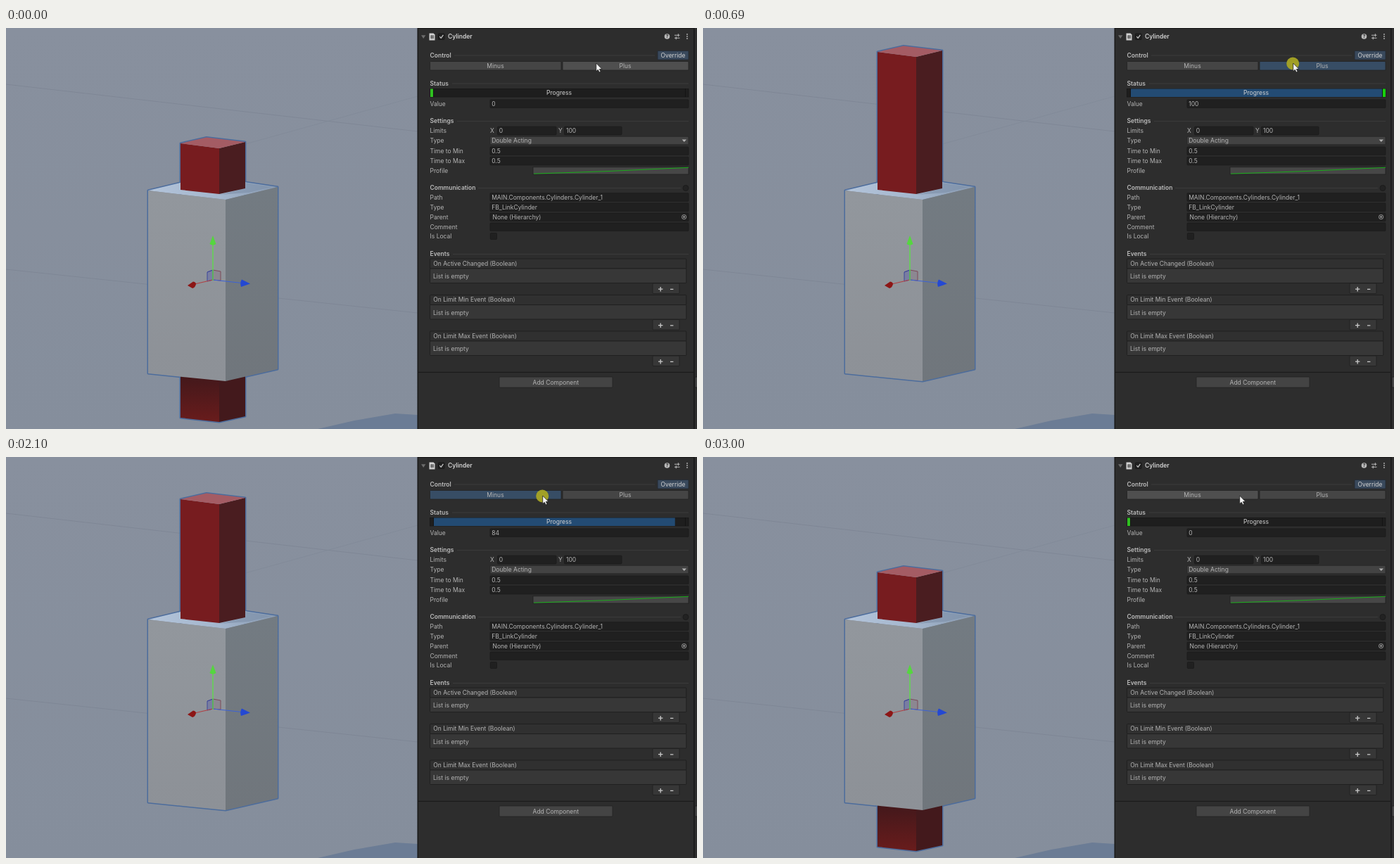
An HTML page that plays this animation: 982x570 px, repeating every 3070 ms.

```html
<!DOCTYPE html>
<html lang="en">
<head>
<meta charset="utf-8">
<title>Cylinder inspector</title>
<style>
  html, body { margin: 0; width: 100%; height: 100%; overflow: hidden; background: #2d2d2d; }
  svg { display: block; }
  text { font: 8.5px Inter, sans-serif; fill: #b4b4b4; white-space: pre; }
  .bold { font-weight: 600; fill: #bcbcbc; }
  .mid { text-anchor: middle; }
  .bright { fill: #d2d2d2; }
</style>
</head>
<body>
<svg id="stage" width="982" height="570" viewBox="0 0 982 570">
  <defs>
    <linearGradient id="sky" x2="0" y2="1"><stop stop-color="#88909e"/><stop offset="1" stop-color="#858e9c"/></linearGradient>
    <linearGradient id="lid"><stop stop-color="#b3c4da"/><stop offset=".55" stop-color="#a4b6cd"/><stop offset="1" stop-color="#8799b0"/></linearGradient>
    <linearGradient id="front" x2="0" y2="1"><stop stop-color="#92979d"/><stop offset="1" stop-color="#8d9197"/></linearGradient>
    <linearGradient id="side" x2="0" y2="1"><stop stop-color="#737b82"/><stop offset="1" stop-color="#70767c"/></linearGradient>
    <linearGradient id="under" gradientUnits="userSpaceOnUse" x1="0" y1="495" x2="0" y2="562"><stop stop-color="#43181b"/><stop offset="1" stop-color="#6a1c1c"/></linearGradient>
    <clipPath id="view"><path d="M0 0H585V570H0Z"/></clipPath>
  </defs>
  <g id="scene" clip-path="url(#view)"></g>
  <g id="panel"></g>
  <g id="pointer"></g>
</svg>
<script>
const LOOP = 3070;
const $ = id => document.getElementById(id);
const scene = $('scene'), panel = $('panel'), pointer = $('pointer');

function add(parent, tag, attrs, text) {
  const el = document.createElementNS('http://www.w3.org/2000/svg', tag);
  for (const key in attrs) el.setAttribute(key, attrs[key]);
  if (text !== undefined) el.textContent = text;
  return parent.appendChild(el);
}
const set = (el, key, value) => el.setAttribute(key, value);
const path = (parent, d, fill, extra) => add(parent, 'path', { d, fill, ...extra });
const line = (parent, d, stroke, width = 1) => path(parent, d, 'none', { stroke, 'stroke-width': width });
const circle = (parent, cx, cy, r, fill, extra) => add(parent, 'circle', { cx, cy, r, fill, ...extra });
const box = (x, y, x2, y2, fill, stroke = 'none', rx = 1) =>
  add(panel, 'rect', { x, y, width: x2 - x, height: y2 - y, fill, stroke, 'stroke-width': .8, rx });
// y is the middle of the text line
const label = (x, y, text, cls = '') => add(panel, 'text', { x, y: y + 3.1, class: cls }, text);
const clamp = (v, lo, hi) => Math.min(hi, Math.max(lo, v));

// ---- 3D view ----
path(scene, 'M0 0H585V570H0Z', 'url(#sky)');
line(scene, 'M0 80L585 147M0 343L585 405', '#7d8594', .8);
line(scene, 'M585 97L250 190', '#808897', .7);
path(scene, 'M443 570L495 558 553 548 585 550V570Z', '#6b7c95');

const outline = { stroke: '#4c6c9c', 'stroke-width': 3, 'stroke-linejoin': 'round' };
const rodEdge = path(scene, '', 'none', outline);
path(scene, 'M202 231L285 211 386 226V485L312 502 202 491Z', 'none', outline);

const lowLeft = path(scene, '', 'url(#under)');
const lowRight = path(scene, '', '#43191c');
path(scene, 'M202 231L285 211 386 226 312 244Z', 'url(#lid)');
path(scene, 'M303 237L340 228 340 220 378 226 345 234Z', '#7e90a8', { opacity: .6 });
path(scene, 'M202 231L312 244V502L202 491Z', 'url(#front)');
path(scene, 'M312 244L386 226V485L312 502Z', 'url(#side)');
const rodLeft = path(scene, '', '#771c1f');
const rodRight = path(scene, '', '#4a1d20');
const rodTop = path(scene, '', '#a45c64');

function drawRod(p) {
  const up = 130 * p, y = v => (v - up).toFixed(2);
  const top = `M248 ${y(164)}L285 ${y(155.5)} 340 ${y(162)} 303 ${y(171)}Z`;
  set(rodTop, 'd', top);
  set(rodLeft, 'd', `M248 ${y(164)}L303 ${y(171)}V236L248 230Z`);
  set(rodRight, 'd', `M303 ${y(171)}L340 ${y(162)}V228L303 236Z`);
  set(lowLeft, 'd', `M248 400V${y(554)}L303 ${y(560)}V400Z`);
  set(lowRight, 'd', `M303 400V${y(560)}L340 ${y(552)}V400Z`);
  set(rodEdge, 'd', `M248 ${y(164)}L285 ${y(155.5)} 340 ${y(162)}V${y(552)}L303 ${y(560)} 248 ${y(554)}Z`);
}

// move handles
path(scene, 'M286 347L294 344V358L286 360Z', '#6a70a6', { stroke: '#3f4799', 'fill-opacity': .6 });
path(scene, 'M294 344L305 346V359L294 358Z', '#8b7f8c', { stroke: '#7c4a58', 'fill-opacity': .6 });
line(scene, 'M286 347L294 344V358', '#3f4799');
line(scene, 'M294 358L268 364', '#b04044', 1.2);
line(scene, 'M294 358L335 362.5', '#3c62d6', 1.2);
line(scene, 'M294 359V307', '#5edb4c', 1.4);
path(scene, 'M294 295L298.5 307Q294 310 289.5 307Z', '#55d63f');
path(scene, 'M258 366L266 360.5Q270 361 270 364 269 369 265 370Z', '#8c1616');
path(scene, 'M347 363.5L335 357.5Q332 362 334 368Z', '#2448d2');

// ---- inspector ----
const EDGE = '#1b1b1b', FIELD = '#202020';
box(585, 0, 982, 570, '#2d2d2d', 'none', 0);
box(584.5, 0, 586, 570, '#191919', 'none', 0);
box(586, 0, 977, 1.2, '#1d1d1d', 'none', 0);
box(977, 0, 978.6, 570, '#191919', 'none', 0);
box(979, 496, 984, 511, '#454545', EDGE);

path(panel, 'M590 10.3H596.4L593.2 15Z', '#6c6c6c');
path(panel, 'M601.5 7.5H607.5L609.5 9.5V17.5H601.5Z', '#d0d0d0');
line(panel, 'M604.6 10V15.4M606.8 10V15.4M603 11.7H608.2M603 13.8H608.2', '#3a3a3a', .8);
box(614.5, 8, 623, 16.5, '#222', '#151515');
line(panel, 'M616.3 12.2L618.2 14.3 621.4 9.8', '#cfcfcf', 1.2);
label(628, 12, 'Cylinder', 'bold bright');
circle(panel, 939.5, 12, 3.8, '#b8b8b8');
add(panel, 'text', { x: 939.5, y: 14.4, class: 'mid', style: 'font-size:6.5px;font-weight:700;fill:#2d2d2d' }, '?');
line(panel, 'M950 10.3H957.5M950 14.2H957.5M955.4 8.3V12.3M952.3 12.2V16.2', '#b8b8b8', 1.1);
for (const dy of [-3, 0, 3]) circle(panel, 968, 12 + dy, .9, '#b8b8b8');

const heads = [['Control', 38.5, 637, 922], ['Status', 78.5, 634, 970], ['Settings', 132, 641, 970],
  ['Communication', 227, 671, 959], ['Events', 321, 635, 970]];
for (const [name, y, x, x2] of heads) {
  label(602.5, y, name, 'bold');
  line(panel, `M${x} ${y + .5}H${x2}`, '#3d3d3d', .9);
}
circle(panel, 966, 227.5, 4, '#222', { stroke: '#1c1c1c' });

box(926, 32.5, 970, 45, '#39495c', '#222a34');
label(948, 38.5, 'Override', 'mid bright');
const minus = box(602.5, 47.5, 789, 60, '#464646', '#232323');
const plus = box(791, 47.5, 970, 60, '#464646', '#232323');
label(695.5, 53.5, 'Minus', 'mid');
label(880, 53.5, 'Plus', 'mid');

box(602.5, 86.5, 970, 98, '#1e1e1e', '#181818', 0);
const bar = box(608, 86.5, 608, 98, '#234b73', 'none', 0);
line(panel, 'M607.5 86V98M965.5 86V98', '#141414', .9);
const lowLamp = box(603, 86.5, 607, 98, '#2fc020', 'none', 0);
const highLamp = box(966, 86.5, 970, 98, '#18d20c', 'none', 0);
label(786, 92, 'Progress', 'mid bright');

function row(y, name, text, x2 = 970, x = 688) {
  label(602.5, y, name);
  box(x, y - 5.8, x2, y + 5.8, FIELD, EDGE);
  return label(x + 2.2, y, text);
}
const value = row(107.7, 'Value', '0');
row(146, 'Limits', '0', 782, 698.5);
label(688, 146, 'X');
box(793.5, 140.2, 875, 151.8, FIELD, EDGE);
label(785, 146, 'Y');
label(796, 146, '100');
label(602.5, 160, 'Type');
box(688, 154.2, 970, 165.8, '#434343', '#252525');
label(690.2, 160, 'Double Acting');
path(panel, 'M960.7 158.4H967L963.8 162Z', '#b4b4b4');
row(174.8, 'Time to Min', '0.5');
row(189, 'Time to Max', '0.5');
label(602.5, 203, 'Profile');
box(749, 197.8, 970, 208, '#474747', '#202020', 0);
line(panel, 'M750 207.2L855 203.6 970 198.3', '#18ad18');

row(240.5, 'Path', 'MAIN.Components.Cylinders.Cylinder_1');
row(254.7, 'Type', 'FB_LinkCylinder');
row(268.8, 'Parent', '').remove();
label(691.5, 268.8, 'None (Hierarchy)');
circle(panel, 963.6, 268.6, 3.1, 'none', { stroke: '#a8a8a8', 'stroke-width': .9 });
circle(panel, 963.6, 268.6, 1.3, '#a8a8a8');
row(282.8, 'Comment', '');
label(602.5, 296, 'Is Local');
box(688.3, 291.5, 697.5, 300.5, FIELD, EDGE);

['Active Changed', 'Limit Min Event', 'Limit Max Event'].forEach((name, i) => {
  const y = 328 + 51.5 * i;
  box(602.5, y, 966.8, y + 14, '#303030', '#1c1c1c');
  box(602.5, y + 14, 966.8, y + 34.5, '#373737', '#1c1c1c');
  box(919, y + 35, 957, y + 49.5, '#373737', '#1f1f1f');
  label(607.3, y + 6.8, `On ${name} (Boolean)`);
  label(607, y + 25.3, 'List is empty');
  line(panel, `M927 ${y + 43.2}H933.4M930.2 ${y + 40}V${y + 46.4}M944 ${y + 43.4}H948.4`, '#cacaca', 1.3);
});

box(586, 488.8, 977, 490, '#1a1a1a', 'none', 0);
box(701, 496, 862, 511, '#444', '#232323');
label(781.3, 503.5, 'Add Component', 'mid');

const halo = circle(pointer, -.5, .5, 9, '#a5a324', { opacity: .96 });
path(pointer, 'M0 0V11.6L2.6 9.3 4.4 13 6.4 12.1 4.7 8.5H8.3Z', '#f4f4f4',
  { stroke: '#1c1c1c', 'stroke-width': .8, 'stroke-linejoin': 'round' });

// ---- motion ----
const PRESS = '#374d65', HOVER = '#4f4f4f', IDLE = '#454545';
const stepOf = (t, start, length) => Math.floor((t - start) / length);

function render(t) {
  const down = t >= 2030;
  // travel grows 14 per screen update, counted in physics ticks of 4
  let u = -20;
  if (down) u = 4 + 14 * stepOf(t, 2027, 71.4);
  else if (t >= 130) u = 8 + 14 * stepOf(t, 130, 70);
  u = Math.floor(u / 4) * 4;
  const travel = offset => {
    const v = clamp(u + offset, 0, 100);
    return down ? 100 - v : v;
  };

  const shown = travel(0), done = travel(-12);
  drawRod(travel(4) / 100);
  value.textContent = down && shown > 0 && shown < 50 ? (shown - .00002).toFixed(5) : shown;
  set(bar, 'width', 3.57 * done);
  set(lowLamp, 'visibility', done === 0 ? 'visible' : 'hidden');
  set(highLamp, 'visibility', done === 100 ? 'visible' : 'hidden');

  const k = clamp(stepOf(t, 1490, 68.3) + 1, 0, 7) / 7;
  const e = k * k * (3 - 2 * k);
  const x = 838.7 - 76 * e, y = 50 + 5 * e;
  set(pointer, 'transform', `translate(${x} ${y})`);

  const pressed = (t >= 130 && t < 1290) || (t >= 2030 && t < 3000);
  const active = pressed ? PRESS : HOVER;
  set(halo, 'visibility', pressed ? 'visible' : 'hidden');
  set(plus, 'fill', x > 790 ? active : IDLE);
  set(minus, 'fill', x < 790 ? active : IDLE);
}

function tick() {
  render(performance.now() % LOOP);
  requestAnimationFrame(tick);
}
tick();
</script>
</body>
</html>
```
